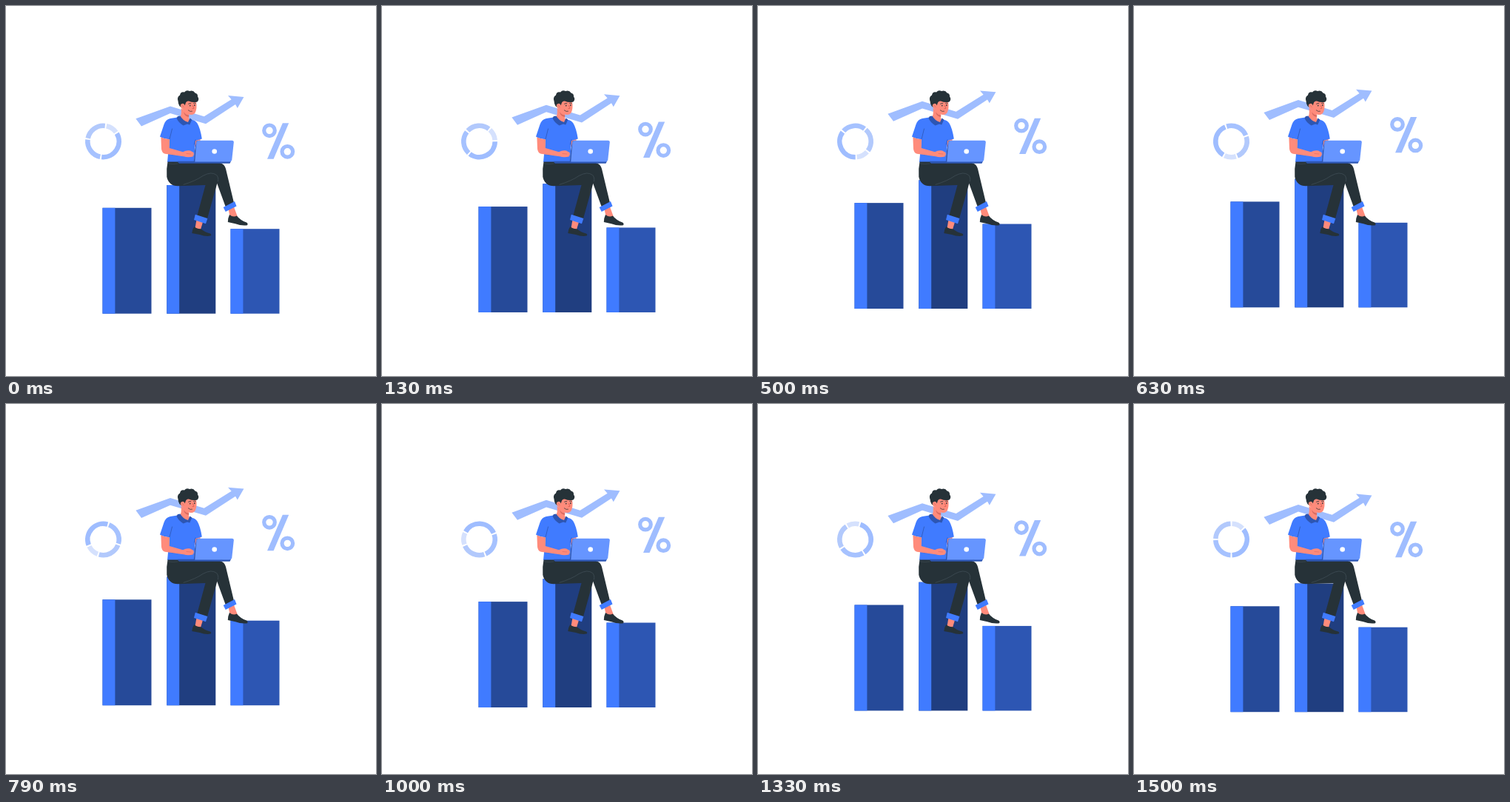
An HTML page for the animation above (1540 ms loop, 500 by 500 pixels).

```html
<!DOCTYPE html>
<html lang="en">
<head>
<meta charset="utf-8">
<title>Growth chart</title>
<style>
html, body { margin: 0; width: 100%; height: 100%; overflow: hidden; background: #fff; }
svg { display: block; width: 100vw; height: 100vh; }
.blue { fill: #407bff; }
.pale { fill: #9fbdff; }
.dark { fill: #263238; }
.skin { fill: #ff8b7b; }
.line { fill: none; stroke-linecap: round; stroke-linejoin: round; }
</style>
</head>
<body>
<svg viewBox="0 0 500 500" xmlns="http://www.w3.org/2000/svg">
  <g id="donut" fill="none" stroke-width="6.6"></g>

  <g class="float">
    <path class="pale" d="M175.4 152.8 222 136 267.7 149.8 304.6 126.8 300 121.6 321.4 123.4 312.8 138.4 310 133.6 270 159.8 222 145.6 183 163Z"/>
    <g fill="none" stroke="#9fbdff" stroke-width="5.2">
      <circle cx="356" cy="168.8" r="7.3"/>
      <circle cx="380.3" cy="197.3" r="7.3"/>
    </g>
    <path class="pale" d="M373.8 158.8H382.2L361.6 207.2H353Z"/>
  </g>
  <g class="float" id="bars"></g>

  <g id="person">
    <!-- far arm, neck -->
    <path class="skin" d="M254 180 263 178.500 261 190 254 190Z"/>
    <path class="skin" d="M236.500 138 247 145Q246 151 249 155L244 160 234 153Q238 147 236.500 138Z"/>
    <path d="M240 143Q243 147.500 247.500 147.500L247 150Q241 149 240 143Z" fill="#d96c61"/>

    <!-- head -->
    <path class="skin" d="M238 128 256 127Q258.600 134 256.800 141 255.500 147 250 147 243.500 146.500 240 141L237 137Z"/>
    <path class="dark" d="M238.500 137.500Q233 136 232.600 129 230.500 123 235 120.500 236 115.500 241 116.500 244 112.800 248 115 253 113.200 255.500 117.500 259.500 118.500 259 122.500 261.800 126 258.500 129.500 253 131 247 128.500 243.500 128 242.500 132L241 137Z"/>
    <ellipse class="skin" cx="239" cy="135.300" rx="3" ry="3.500" transform="rotate(-20 239 135.300)"/>
    <path class="line" d="M237.800 134.500Q239.800 134.500 240.300 136.800" stroke="#d96c61" stroke-width=".6"/>
    <g class="dark">
      <ellipse cx="248.800" cy="134.600" rx=".7" ry="1.100"/>
      <ellipse cx="254.800" cy="134.200" rx=".7" ry="1.100"/>
    </g>
    <path class="line" d="M246.500 132.300Q248 130.800 249.800 131.500M253.500 131.300Q255 130.500 256.300 131.600" stroke="#263238" stroke-width=".8"/>
    <path class="line" d="M252.300 134.500 254 138.300 251.800 138.700" stroke="#d9594f" stroke-width=".8"/>
    <path class="line" d="M246.300 140.800Q248.500 143.300 251.500 142.300" stroke="#263238" stroke-width=".7"/>

    <!-- shirt -->
    <path class="blue" d="M231.500 150.500 222 152Q216 153 213.500 160L208 176.500Q213 179.800 221 180.300L218 211H254L256 182 264.800 179.500Q262.500 165 258.500 158.500 256 154.500 250.500 153.500L246 159Q237 158 231.500 150.500Z"/>
    <path d="M232 149 235.500 148.500Q239 155 246 157L248.500 151.500 251.300 153.500 248.300 160.500 245 159.500 239.500 161.500Q232.500 157 230.500 151.500Z" fill="#2d56b3"/>
    <path class="line" d="M221 180 224.500 166M256 181 254.500 187M220 199Q224 202 229 201" stroke="#2d56b3" stroke-width=".8"/>

    <!-- trousers and shoes -->
    <path class="skin" d="M300.500 274 308 271.500 313 285 303 287Z"/>
    <path class="dark" d="M302 282Q307 286 311.800 283.600 317 290 325 292.500 327.500 294 326 296.300 318 297.300 310 294.300L299.800 292Q300 286 302 282Z"/>
    <path class="dark" d="M250 212H289Q295 213 297 220L308 266 297 272 282 231Z"/>
    <path class="blue" d="M293.700 272 309 264 311.500 270.500 296.700 278Z"/>
    <path class="skin" d="M257.500 289 266 292 263 302 255.500 300Z"/>
    <path class="dark" d="M254.500 298Q258 301.500 263.500 301.200 269 306 276 307.500 278.200 309 276.500 310.600 269 311.600 262 309L251.300 307Q252 301 254.500 298Z"/>
    <path class="dark" d="M218.500 210.500H270Q289 214 287.500 232L271.500 289 258 284.500 269.500 242 232 243.300Q220 243 217.300 231 216.500 220 218.500 210.500Z"/>
    <path class="blue" d="M255.800 281.700 272.300 287 270 294.300 254 289Z"/>
    <path class="line" d="M240 241.300Q257 236 266 229.500 278 223 284.500 228.500 287.500 231 286.500 237" stroke="#435159" stroke-width=".7"/>
    <path class="line" d="M219 213Q226 214 232 213" stroke="#435159" stroke-width=".6"/>

    <!-- near arm -->
    <path class="skin" d="M209.400 177.200Q214 179.800 221 180.300L220.800 192 239 197.300Q244 194.500 249 195.500L253.500 198Q254.500 201 252.500 203.500 246 205 240 203.300L215 199.800Q210.500 198.500 210 193Z"/>
    <path class="line" d="M244 199.500 250 200" stroke="#d96c61" stroke-width=".6"/>

    <!-- laptop -->
    <path d="M232 209.800H304L302.500 212.700H234Q232 212 232 209.800Z" fill="#2d56b3"/>
    <path d="M257.500 182.200H260L257 211H253.800Q254.500 194 257.500 182.200Z" fill="#2d56b3"/>
    <path d="M260 181.800H305.500Q308 181.900 307.800 184.300L305.300 207.500Q304.700 210.500 302 210.600H255.300L257.300 184.500Q257.700 182 260 181.800Z" fill="#6695ff"/>
    <circle cx="281.700" cy="196.500" r="3.300" fill="#fff"/>
  </g>
</svg>
<script>
const byId = id => document.getElementById(id);

function add(parent, tag, attrs) {
  const el = document.createElementNS("http://www.w3.org/2000/svg", tag);
  for (const key in attrs) el.setAttribute(key, attrs[key]);
  parent.appendChild(el);
}

// Bars: left edge, top, side colour
const BASE = 416.2, WIDTH = 66, FRONT = 16.9;
[[130.5, 273.3, "#264a99"], [217.3, 242.5, "#203e80"], [303.5, 301.7, "#2d56b3"]]
  .forEach(([x, y, fill]) => {
    const height = BASE - y;
    add(byId("bars"), "rect", { x, y, width: WIDTH, height, fill });
    add(byId("bars"), "rect", { x, y, width: FRONT, height, fill: "#407bff" });
  });

// Ring slices, in degrees clockwise from the top
const CX = 131.5, CY = 183, R = 21.2, GAP = 2.7;
const polar = deg => {
  const a = deg * Math.PI / 180;
  return `${CX + R * Math.sin(a)} ${CY - R * Math.cos(a)}`;
};
[[0, 48, "#d5e1fd"], [48, 180, "#9fbdff"], [180, 270, "#a6c2ff"], [270, 360, "#b2c9fc"]]
  .forEach(([from, to, stroke]) => add(byId("donut"), "path", {
    d: `M${polar(from + GAP)}A${R} ${R} 0 0 1 ${polar(to - GAP)}`, stroke
  }));

const LOOP = 1540, CYCLE = 1500, LEAD = 37, RISE = 10;
const floats = document.querySelectorAll(".float");

function draw(time) {
  const p = Math.min(1, (time % LOOP + LEAD) / CYCLE);
  const dy = -RISE * (1 - Math.abs(2 * p - 1));
  floats.forEach(g => g.setAttribute("transform", `translate(0 ${dy})`));
  byId("donut").setAttribute("transform", `rotate(${360 * p} ${CX} ${CY})`);
}

let start;
function tick(now) {
  start ??= now;
  draw(now - start);
  requestAnimationFrame(tick);
}
draw(0);
requestAnimationFrame(tick);
</script>
</body>
</html>
```
